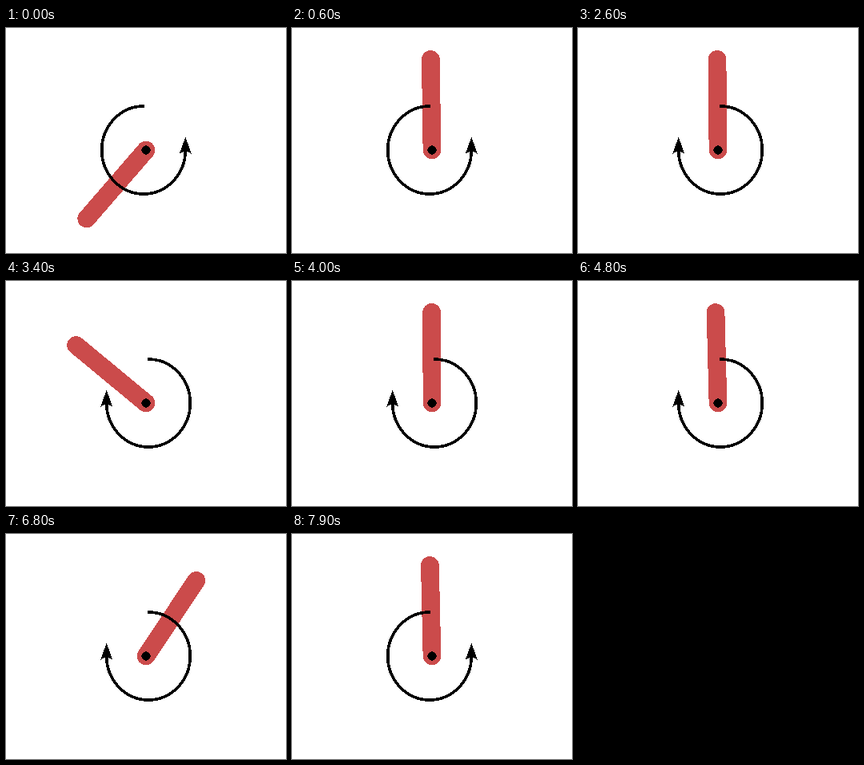
Recreate the animation shown at these times as an HTML page. Size 350 by 282 pixels, loop 8 s.

```html
<!DOCTYPE html>
<html lang="en">
<head>
<meta charset="utf-8">
<title>Balancing pendulum</title>
<style>
  html, body { margin: 0; width: 350px; height: 282px; overflow: hidden; background: #fff; }
  svg { display: block; }
</style>
</head>
<body>
<svg width="350" height="282" viewBox="0 0 350 282" shape-rendering="crispEdges">
  <g transform="translate(175 153)">
    <line id="rod" y2="-113.6" stroke="#cb4b4b" stroke-width="22.72" stroke-linecap="round"/>
    <circle r="5.68"/>
    <g id="torque">
      <path d="M-2 -55 H-3 A52.3 55 0 1 0 49.3 0" fill="none" stroke="#000" stroke-width="3.6"/>
      <path d="M49.3 -16.5 L57 5 L49.3 .3 L41.6 5 Z"/>
    </g>
  </g>
</svg>
<script>
const rod = document.getElementById('rod');
const torque = document.getElementById('torque');
const STEP = 100, LOOP = 8000, RUN_STEPS = 33;

// Each run swings up from `from` degrees (clockwise from upright)
const runs = [
  { from: 220.8, rate: 0.444, power: 1.4 },
  { from: -114.6, rate: 0.823, power: 1.4 },
  { from: 231.2, rate: 0.4, power: 2.27 }
];

// Push toward upright while far away, brake when close
function swing({ from, rate, power }, n) {
  const angle = from * Math.exp(-rate * n ** power);
  const push = Math.abs(angle) > 35 ? -1 : 1;
  return { angle, turn: push * Math.sign(angle) };
}

// Small rocking left of upright, held by a torque that flips
function balance(step) {
  const phase = 2.658 * step - 5.058;
  return {
    angle: 0.75 * (Math.cos(phase) - 1),
    turn: Math.sin(phase) < -0.4 ? -1 : 1
  };
}

function poseAt(step) {
  const run = runs[Math.floor(step / RUN_STEPS)];
  const pose = swing(run, step % RUN_STEPS);
  return Math.abs(pose.angle) > 5 ? pose : balance(step);
}

function draw(time) {
  const { angle, turn } = poseAt(Math.floor(time / STEP));
  rod.setAttribute('transform', `rotate(${angle})`);
  torque.setAttribute('transform', `scale(${-turn} 1)`);
}

const began = performance.now();
function tick() {
  draw((performance.now() - began) % LOOP);
  requestAnimationFrame(tick);
}
tick();
</script>
</body>
</html>
```
